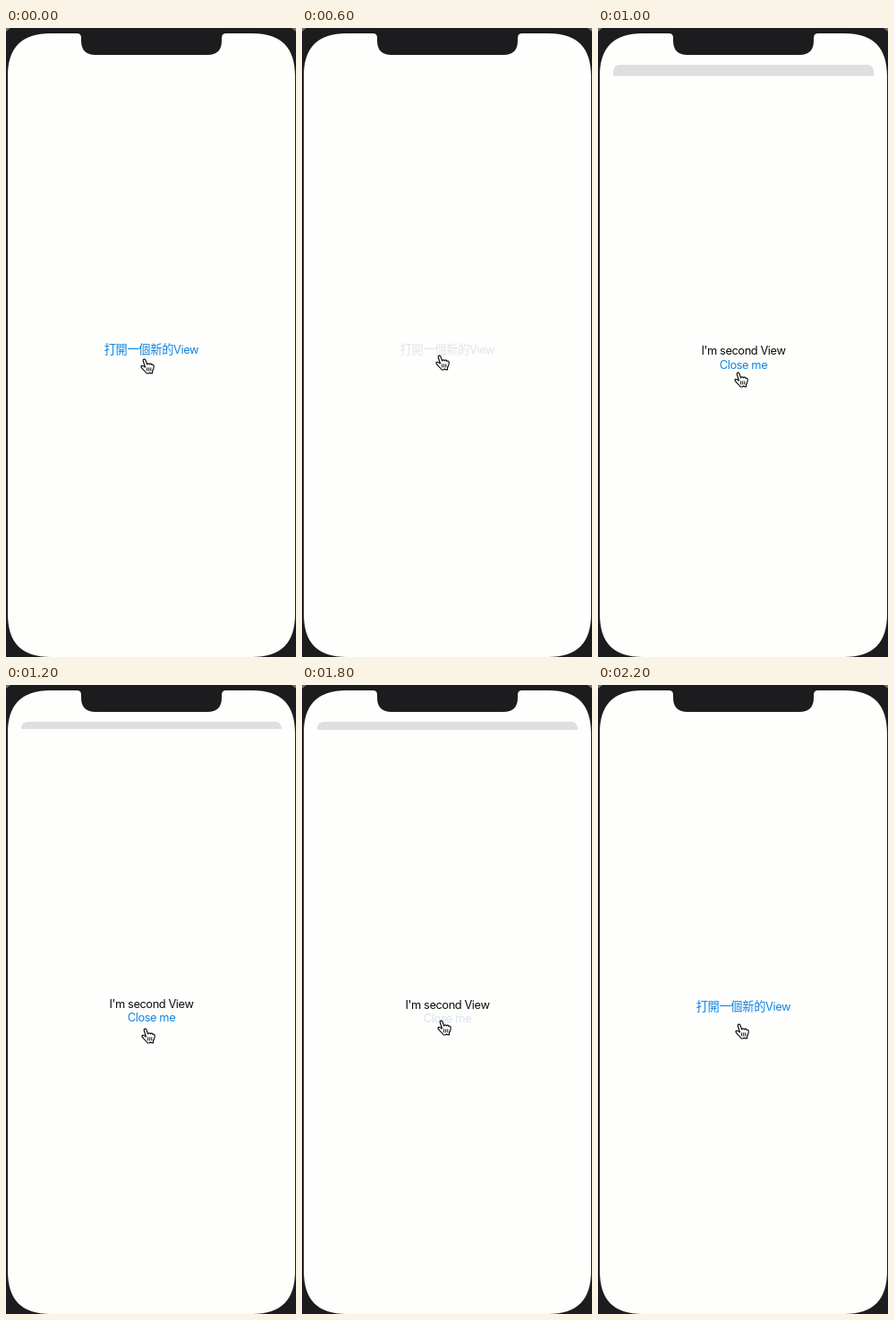
These frames come from a looping animation (324x701 px, 2400 ms). An HTML page with a canvas:

```html
<!DOCTYPE html>
<html lang="zh-Hant">
<head>
<meta charset="utf-8">
<title>Sheet demo</title>
<style>
html, body { margin: 0; width: 100%; height: 100%; overflow: hidden; background: #1c1c1e; }
canvas { display: block; width: 324px; height: 701px; }
</style>
</head>
<body>
<canvas id="stage"></canvas>
<script>
const W = 324, H = 701, STEP = 200, STEPS = 12, MID = 162.5;
const BEZEL = '#1c1c1e', PAPER = '#fefefc', BLUE = '#0d84e3', INK = '#0b0b0b';
const FONT = '12.8px Inter, "Noto Sans CJK TC", "Noto Sans CJK", sans-serif';
const CJK_FONT = '13.2px "Noto Sans CJK TC", "Noto Sans CJK JP", "Noto Sans CJK", sans-serif';

const canvas = document.getElementById('stage');
const ctx = canvas.getContext('2d');
const ratio = window.devicePixelRatio || 1;
canvas.width = W * ratio;
canvas.height = H * ratio;

// Top left of the hand at each step
const handPath = [
  [150, 368], [150, 369], [149, 364], [149, 364], [149, 364.5], [152, 383],
  [151, 382], [151, 376], [150.5, 368], [151, 373], [152, 374], [153, 377]
];

// Height of the sheet's upper edge while it is open
const sheetTop = { 4: 172, 5: 53.5, 6: 49, 7: 49, 8: 49, 9: 50 };

const screen = new Path2D(
  'M2 54 C2 22 17 6 50 6 H79 Q84 6 84 11 V14 Q84 30 100 30' +
  'H225 Q241 30 241 14 V11 Q241 6 246 6 H275 C308 6 323 22 323 54' +
  'V653 C323 685 308 701 275 701 H50 C17 701 2 685 2 653 Z');

const hand = new Path2D(
  'M5.5 10 L3.3 3.3 C2.7 1.1 5.1 .2 5.9 2.1 L7.7 7 C8 5.5 10 5.3 10.4 6.9' +
  'C11 5.7 12.6 6 12.9 7.5 C13.8 6.8 15.1 7.3 15.2 8.9' +
  'C15.4 11.6 14.3 12.8 13.6 14.4 L13.5 16.8 L11.4 16.7 L10.4 16 L9.2 17 H7.2' +
  'C6 15 4 13.5 2.6 11.9 C1 10.2 .3 9 1.6 8.4 C3 7.9 4.2 9 5.5 10 Z');

const fingers = new Path2D('M7.6 10.4 V14.4 M9.7 10.4 V14.4 M11.8 10.4 V14.4');

function drawText(str, x, y, color, font = FONT, spacing = -0.4) {
  ctx.font = font;
  ctx.letterSpacing = spacing + 'px';
  ctx.fillStyle = color;
  ctx.fillText(str, x, y);
  return ctx.measureText(str).width;
}

function centerText(str, y, color) {
  ctx.font = FONT;
  ctx.letterSpacing = '-0.4px';
  drawText(str, MID - ctx.measureText(str).width / 2, y, color);
}

function drawHome(step) {
  const color = step === 3 ? '#e3e4e8' : step === 10 ? '#3f95d8' : BLUE;
  const width = drawText('打開一個新的', 109.7, 363, color, CJK_FONT, -0.3);
  drawText('View', 109.7 + width, 363, color);
}

function drawSheet(step) {
  const top = sheetTop[step];
  const rising = step === 4;
  const left = rising ? 14 : 17;
  const back = rising ? 35 : 41;
  const r = rising ? 10 : 7;
  ctx.fillStyle = rising ? '#e6e6e6' : '#dfdfdf';
  ctx.beginPath();
  ctx.roundRect(left, back, 2 * (MID - left), top - back, [r, r, 0, 0]);
  ctx.fill();
  centerText("I'm second View", top + 310.5, INK);
  centerText('Close me', top + 326, step === 9 ? '#d5e4f6' : BLUE);
}

function drawPhone() {
  ctx.fillStyle = BEZEL;
  ctx.fillRect(0, 0, W, H);
  ctx.fillStyle = '#6f7373';
  ctx.fill(new Path2D('M0 0 H5 L0 4 Z M324 0 H319 L324 4 Z'));
  ctx.fillStyle = PAPER;
  ctx.fill(screen);
}

function drawHand([x, y]) {
  ctx.save();
  ctx.translate(x, y);
  ctx.lineJoin = 'round';
  ctx.fillStyle = '#fff';
  ctx.strokeStyle = '#111';
  ctx.lineWidth = 1.2;
  ctx.fill(hand);
  ctx.stroke(hand);
  ctx.lineWidth = 1;
  ctx.stroke(fingers);
  ctx.restore();
}

function draw(now) {
  const step = Math.floor(now / STEP) % STEPS;
  ctx.setTransform(ratio, 0, 0, ratio, 0, 0);
  drawPhone();
  if (step in sheetTop) drawSheet(step);
  else drawHome(step);
  drawHand(handPath[step]);
}

const start = performance.now();
function tick() {
  draw(performance.now() - start);
  requestAnimationFrame(tick);
}
tick();
</script>
</body>
</html>
```
